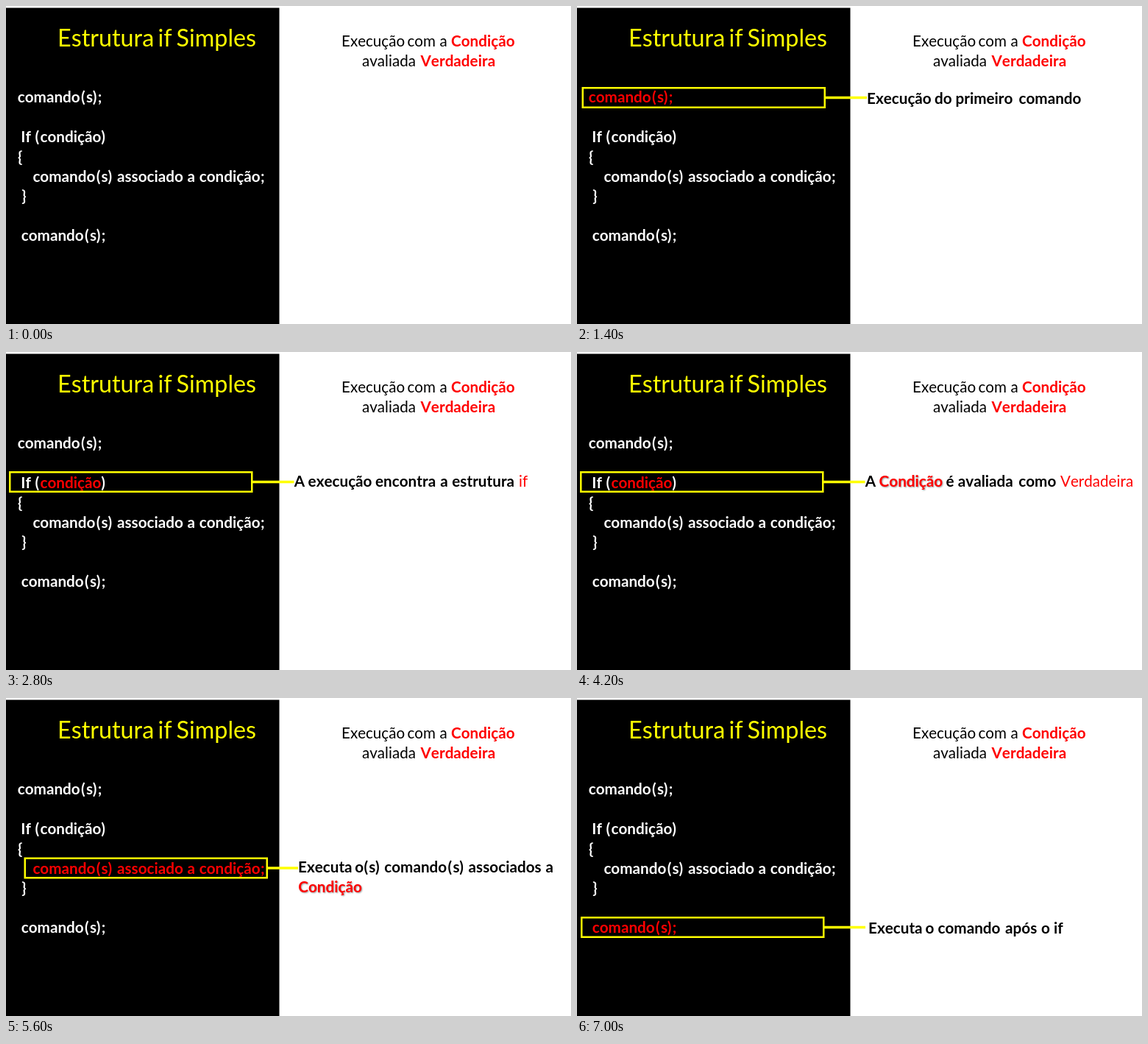
These frames come from a looping animation (768x432 px, 8 s). An HTML page with a canvas:

```html
<!DOCTYPE html>
<html lang="pt">
<head>
<meta charset="utf-8">
<title>Estrutura if Simples</title>
<style>
  html, body { margin: 0; width: 100%; height: 100%; overflow: hidden; background: #fff; }
  canvas { display: block; }
</style>
</head>
<body>
<canvas id="stage" width="768" height="432"></canvas>
<script>
const ctx = document.getElementById('stage').getContext('2d');
const LOOP = 8000, STEP = 1400;
const RED = '#f00', YELLOW = '#ff0', WHITE = '#fff', BLACK = '#000';
const REGULAR = '400 20.6px Lato, sans-serif';
const BOLD = '700 20.7px Lato, sans-serif';
const TITLE = '400 32.3px Lato, sans-serif';
ctx.fontKerning = 'none';

// Each word is [x, text, color?, font?]
function line(y, color, font, ...words) {
  for (const [x, text, ownColor = color, ownFont = font] of words) {
    ctx.fillStyle = ownColor;
    ctx.font = ownFont;
    ctx.fillText(text, x, y);
  }
}

// "comando(s)" with loosely set parentheses
function command(x, end = '') {
  return [[x, 'comando'], [x + 86.3, '('], [x + 93.2, 's'], [x + 102, ')'], [x + 109, end]];
}

function shadowed(x, y, text) {
  ctx.save();
  ctx.shadowColor = 'rgba(0, 0, 0, 0.4)';
  ctx.shadowBlur = 2;
  ctx.shadowOffsetX = ctx.shadowOffsetY = 1;
  line(y, RED, BOLD, [x, text]);
  ctx.restore();
}

function callout(x, y, lineY, lineEnd) {
  ctx.strokeStyle = YELLOW;
  ctx.lineWidth = 2.5;
  ctx.strokeRect(x + 1.25, y + 1.25, 329, 26.5);
  ctx.lineWidth = 3.5;
  ctx.beginPath();
  ctx.moveTo(x + 330, lineY);
  ctx.lineTo(lineEnd, lineY);
  ctx.stroke();
}

function note(y, ...words) {
  line(y, BLACK, BOLD, ...words);
}

function conditionCallout() {
  callout(4, 162, 176.5, 391.5);
}

const steps = [
  () => {},
  () => {
    callout(6.5, 110, 124.5, 394);
    note(133, [394, 'Execução'], [486, 'do'], [514.5, 'primeiro'], [600.5, 'comando']);
  },
  () => {
    conditionCallout();
    note(183, [391.8, 'A'], [410.6, 'execução'], [502, 'encontra'], [590.2, 'a'],
      [606.3, 'estrutura'], [697, 'if', RED, REGULAR]);
  },
  () => {
    conditionCallout();
    note(183, [391.8, 'A'], [501.4, 'é'], [517.8, 'avaliada'], [600.2, 'como'],
      [657, 'Verdadeira', RED, REGULAR]);
    shadowed(410.6, 183, 'Condição');
  },
  () => {
    callout(24.5, 216.5, 231, 397);
    note(237, [397, 'Executa'], [474.3, 'o'], [486.5, '('], [493.3, 's'], [502, ')'],
      ...command(514.2), [628.6, 'associados'], [733.5, 'a']);
    shadowed(397.3, 264, 'Condição');
  },
  () => {
    callout(5, 297, 311.5, 392);
    note(320, [396, 'Executa'], [473.5, 'o'], [490.5, 'comando'], [582, 'após'],
      [631, 'o'], [648, 'if']);
  }
];

function drawCode(step) {
  const tone = (...active) => active.includes(step) ? RED : WHITE;
  line(131, tone(1), BOLD, ...command(15.7, ';'));
  line(184.5, WHITE, BOLD, [20.3, 'If'], [39.5, '('], [46.5, 'condição', tone(2, 3)], [129.3, ')']);
  line(211.5, WHITE, BOLD, [16, '{']);
  line(238.5, tone(4), BOLD, ...command(36.4), [151, 'associado'], [246.5, 'a'],
    [262.7, 'condição'], [346, ';']);
  line(265, WHITE, BOLD, [21.3, '}']);
  line(319, tone(5), BOLD, ...command(20.7, ';'));
}

function draw(time) {
  const step = Math.floor((time % LOOP) / STEP);
  ctx.fillStyle = WHITE;
  ctx.fillRect(0, 0, 768, 432);
  ctx.fillStyle = BLACK;
  ctx.fillRect(0, 2.5, 371.5, 429.5);
  line(55, YELLOW, TITLE, [70, 'Estrutura'], [206.5, 'if'], [231.5, 'Simples']);
  line(55, BLACK, REGULAR, [456, 'Execução'], [545.5, 'com'], [589.5, 'a'], [605, 'Condição', RED, BOLD]);
  line(82, BLACK, REGULAR, [484, 'avaliada'], [563.5, 'Verdadeira', RED, BOLD]);
  drawCode(step);
  steps[step]();
}

function tick() {
  draw(performance.now());
  requestAnimationFrame(tick);
}
tick();
</script>
</body>
</html>
```
